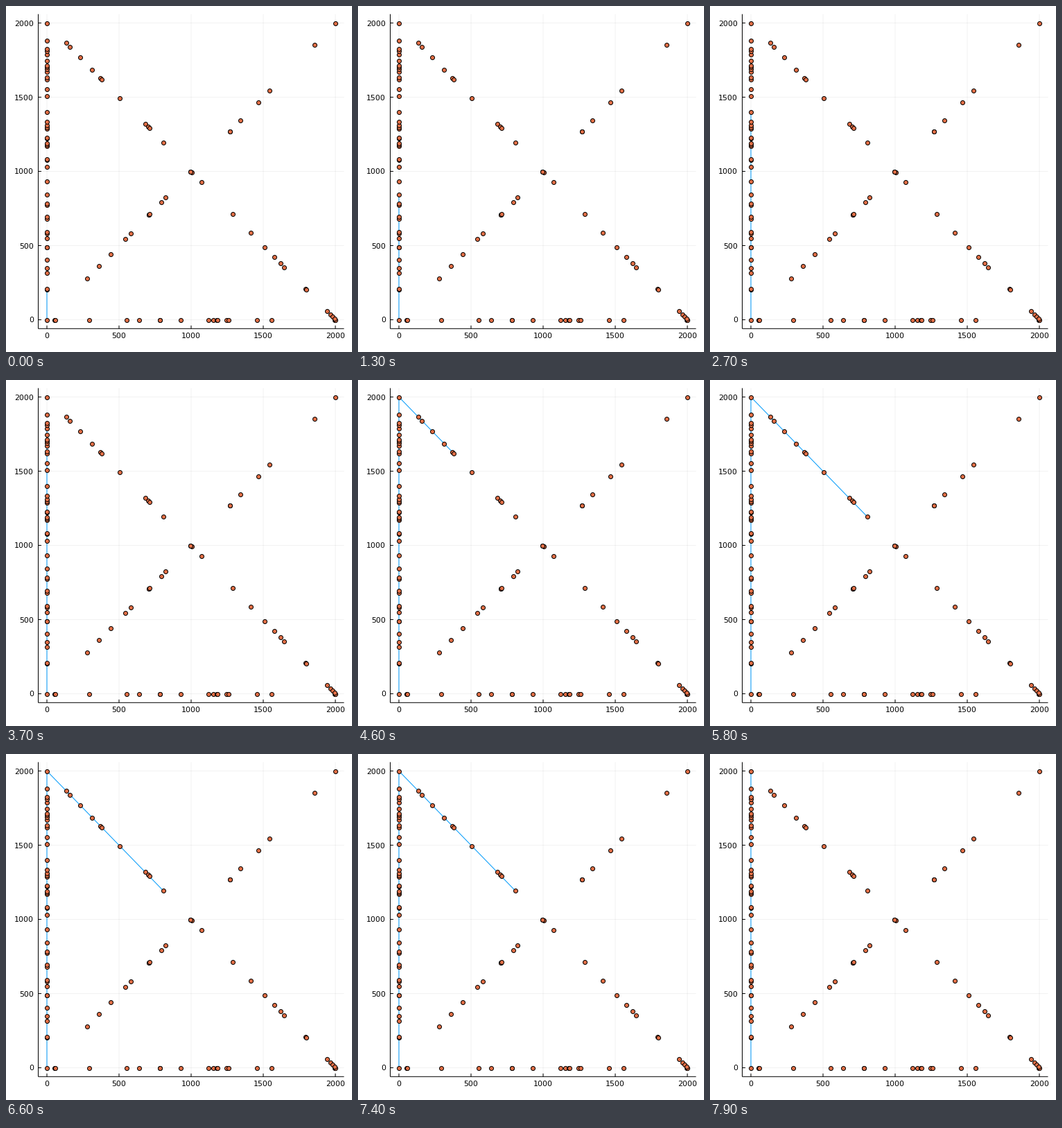
Write a matplotlib script that moves like this. It is 499x499 px and loops after 8000 ms.

```python
import matplotlib.pyplot as plt
from matplotlib.animation import FuncAnimation

SIZE, DPI = 499, 64
PX = 72 / DPI  # points per pixel
BLUE, ORANGE = "#009AFA", "#E26F46"
LEFT, RIGHT, TOP, BOTTOM = 46.5, 487.5, 11.7, 465.3


def sx(v):
    return 59 + 0.208 * v


def sy(v):
    return 452.5 - 0.214 * v


# Scattered points: left edge, bottom edge and the two diagonals.
left = [0, 205, 207, 315, 350, 405, 488, 490, 550, 583, 593, 680, 692, 773,
        784, 845, 930, 1030, 1078, 1081, 1172, 1180, 1189, 1223, 1226, 1288,
        1295, 1310, 1332, 1400, 1505, 1552, 1620, 1633, 1672, 1690, 1705,
        1712, 1743, 1788, 1810, 1825, 1880, 2000]
bottom = [54, 56, 293, 555, 640, 783, 786, 930, 1122, 1152, 1178, 1182, 1247,
          1260, 1455, 1560, 1995, 2000]
falling = [133, 160, 232, 314, 372, 381, 505, 681, 700, 710, 806]
falling_rest = [1005, 1073, 1287, 1412, 1511, 1579, 1620, 1645, 1794, 1798,
                1940, 1965, 1980, 1995]
rising = [277, 362, 441, 543, 582, 707, 709, 711, 793, 823, 996, 997]
rising_rest = [1268, 1270, 1343, 1467, 1543, 1855, 2000]

edge = [(0, v) for v in left]
chain = edge + [(v, 2000 - v) for v in falling]
points = (chain + [(v, 0) for v in bottom]
          + [(v, 2000 - v) for v in falling_rest]
          + [(v, v) for v in rising + rising_rest])

GROWTH = len(chain) - 2        # frames spent only pushing points
PROBES = 2 * len(rising)       # each probe is pushed, then popped


def hull_at(i):
    """Stack of the angular hull scan at step i."""
    if i < GROWTH:
        return chain[:i + 3]
    k = i - GROWTH
    if k < PROBES:
        v = rising[k // 2]
        return chain + [(v, v)] if k % 2 == 0 else chain
    v = rising_rest[0]
    return edge + [(v, v)] if k == PROBES + 1 else edge


fig = plt.figure(figsize=(SIZE / DPI, SIZE / DPI), dpi=DPI, facecolor="white")
ax = fig.add_axes([0, 0, 1, 1])
ax.set_xlim(0, SIZE)
ax.set_ylim(SIZE, 0)
ax.axis("off")


def rule(xs, ys, width=1, **style):
    ax.plot(xs, ys, color="black", lw=width * PX, snap=False,
            solid_capstyle="butt", **style)


def label(x, y, text, ha):
    ax.text(x, y, text, ha=ha, va="baseline", fontsize=11 * PX,
            family="DejaVu Sans", color="black")


for t in range(0, 2001, 500):
    x, y = sx(t), sy(t)
    rule([x, x], [TOP, BOTTOM], 0.5, alpha=0.1)
    rule([LEFT, RIGHT], [y, y], 0.5, alpha=0.1)
    rule([x, x], [BOTTOM, BOTTOM - 4.5])
    rule([LEFT, LEFT + 4.5], [y, y])
    label(x, 479, str(t), "center")
    label(40, y + 4, str(t), "right")
rule([LEFT, LEFT], [TOP, BOTTOM])
rule([LEFT, RIGHT], [BOTTOM, BOTTOM])

path, = ax.plot([], [], color=BLUE, lw=PX, snap=False, zorder=3)
ax.scatter([sx(x) for x, _ in points], [sy(y) for _, y in points],
           s=(6 * PX) ** 2, facecolor=ORANGE, edgecolor="black",
           linewidth=PX, snap=False, zorder=4)


def draw(i):
    stack = hull_at(i)
    path.set_data([sx(x) for x, _ in stack], [sy(y) for _, y in stack])
    return path,


anim = FuncAnimation(fig, draw, frames=80, interval=100, repeat=True,
                     repeat_delay=0)
plt.show()
```
